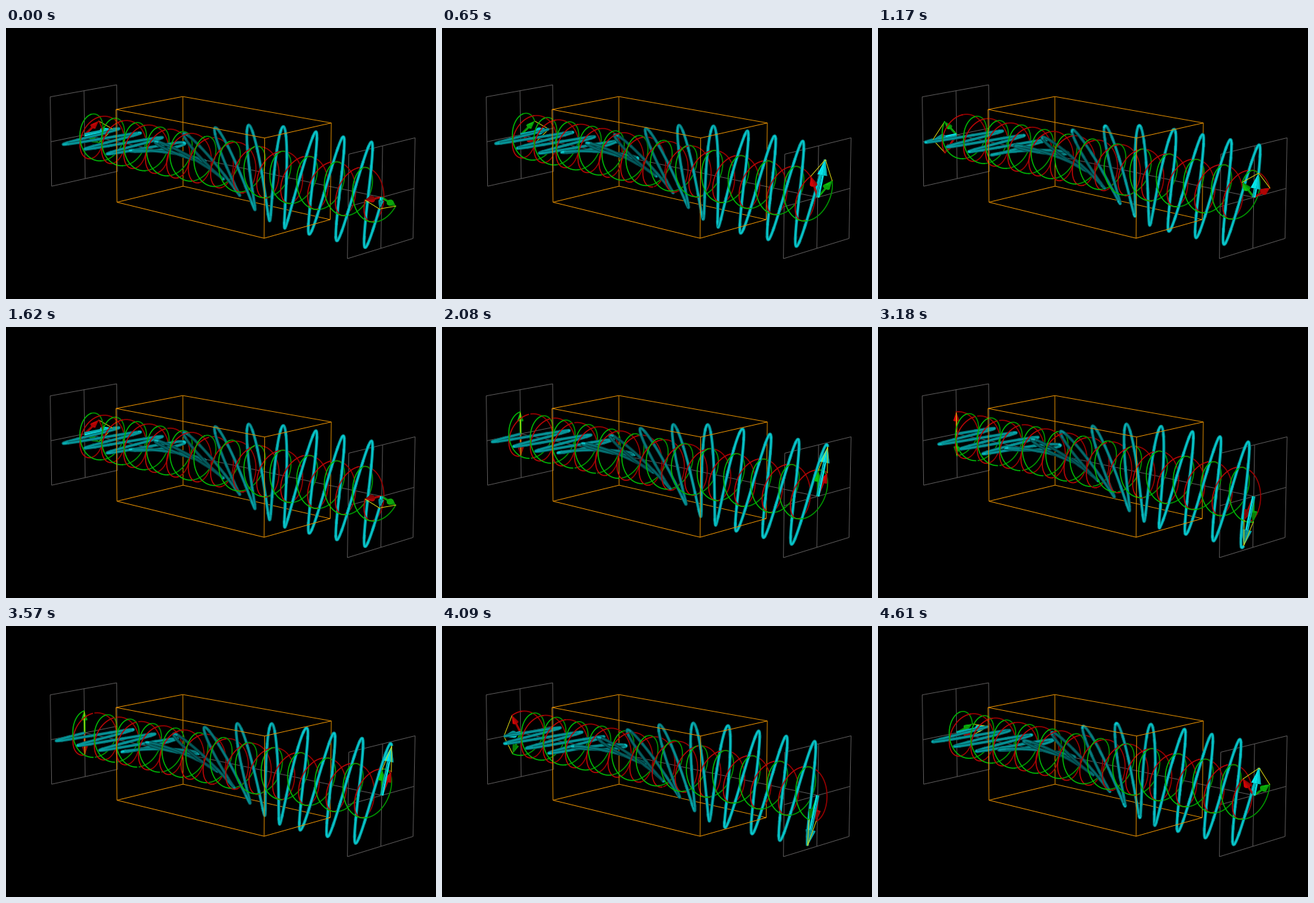
Recreate the animation shown at these times as a matplotlib script. Size 628 by 396 pixels, loop 4.67 s.

```python
import numpy as np
import matplotlib.pyplot as plt
from matplotlib.animation import FuncAnimation
from matplotlib.collections import LineCollection, PolyCollection

W, H, DPI = 628, 396, 100
PX = 72 / DPI
LOOP, STEP = 4670, 10
FRAMES = LOOP // STEP

# Scene axes: s runs along the beam (0..1), u is sideways, v is up (both -1..1).
RIM = [(-1, 1), (1, 1), (1, -1), (-1, -1)]
BOX = (0.25, 0.75)
DEPTH = 6.5               # beam length in units of u and v
TURNS = 12                # waves between the two screens
EXTRA = np.radians(214)   # extra phase of the red wave inside the box
RADIUS = 0.5

POSES = 37                # the picture holds between evenly spaced poses
PACE = [(0, 0), (5, 20), (9, 37), (21, 83), (28, 112), (36, 141)]   # pose, turn
TURN = np.radians(15)

RED, GREEN, CYAN = (0.86, 0.02, 0.02), (0.05, 0.8, 0.05), (0.02, 0.93, 0.95)


def fit_camera():
    """Least-squares perspective matrix from two opposite corners per slice."""
    corners = {(0, -1, 1): (64, 100), (0, 1, -1): (162, 209),
               (0.25, 1, 1): (258, 100), (0.25, -1, -1): (162, 254),
               (0.75, -1, 1): (377, 160), (0.75, 1, -1): (473, 279),
               (1, 1, 1): (597, 160), (1, -1, -1): (498, 337)}
    rows, values = [], []
    for (s, u, v), (x, y) in corners.items():
        p, zero = [s, u, v, 1], [0] * 4
        rows.append(p + zero + [-x * s, -x * u, -x * v])
        rows.append(zero + p + [-y * s, -y * u, -y * v])
        values += [x, y]
    m = np.linalg.lstsq(np.array(rows, float), np.array(values, float), rcond=None)[0]
    return np.append(m, 1).reshape(3, 4)


CAMERA = fit_camera()


def project(s, u, v):
    """Return screen points and their depth (smaller is nearer)."""
    s, u, v = np.broadcast_arrays(*np.atleast_1d(s, u, v))
    x, y, w = CAMERA @ np.array([s, u, v, np.ones(s.shape)], float)
    return np.column_stack([x / w, y / w]), w


def line3d(a, b):
    return project(*np.array([a, b], float).T)[0]


def unit(angle):
    return np.array([np.cos(angle), np.sin(angle)])


fig = plt.figure(figsize=(W / DPI, H / DPI), dpi=DPI, facecolor="black")
ax = fig.add_axes([0, 0, 1, 1])
ax.set_xlim(-0.5, W - 0.5)     # whole numbers are pixel centres
ax.set_ylim(H - 0.5, -0.5)
ax.axis("off")


def add_lines(segments, color, z):
    ax.add_collection(LineCollection(segments, colors=color, linewidths=PX, zorder=z))


def draw_set():
    grid = [line3d((0, 0, 0), (1, 0, 0))]
    for s in (0, 1):
        grid += [line3d((s, *RIM[k]), (s, *RIM[k - 1])) for k in range(4)]
        grid.append(line3d((s, -1, 0), (s, 1, 0)))
        grid.append(line3d((s, 0, -1), (s, 0, 1)))
    add_lines(grid, "#5a5858", 1)

    near, far = [], []
    for k, corner in enumerate(RIM):
        behind = corner[0] > 0
        (far if behind else near).append(line3d(*((s, *corner) for s in BOX)))
        behind = behind and RIM[k - 1][0] > 0
        for s in BOX:
            (far if behind else near).append(line3d((s, *corner), (s, *RIM[k - 1])))
    add_lines(far, "#d88800", 1.5)
    add_lines(near, "#e48e00", 5)


draw_set()

# Beam samples and the phase each circular wave gathers along the way
N = 601
S = np.linspace(0, 1, N)
GREEN_PHASE = 2 * np.pi * TURNS * S
RED_PHASE = GREEN_PHASE + EXTRA * np.clip((S - BOX[0]) / (BOX[1] - BOX[0]), 0, 1)

helices = []
for back, front in (("#980000", "#b80606"), ("#009400", "#00b606")):
    helices.append([ax.plot([], [], color=c, lw=1.6 * PX, zorder=z)[0]
                    for c, z in ((back, 2), (front, 4))])

# The tube is built from short chunks; each strand gets its rim, then its core.
CHUNK, STRAND = 4, 24
parts = [(a, core) for start in range(0, N - 1, STRAND) for core in (False, True)
         for a in range(start, min(start + STRAND, N - 1), CHUNK)]
STARTS = np.array([a for a, _ in parts])
CORE = np.array([core for _, core in parts])
tube = LineCollection([], linewidths=np.where(CORE, 2.4, 4.5) * PX,
                      capstyle="butt", joinstyle="round", zorder=3)
ax.add_collection(tube)
LIGHT = unit(np.radians(145))

arrows, ties = [], []
for z in (1.8, 6):
    arrows.append(ax.add_collection(PolyCollection([], linewidths=0, zorder=z)))
    ties.append(ax.plot([], [], color="#d8d410", lw=PX, zorder=z + 0.1)[0])


def arrow(s, tip, color, head, radius, width):
    """Polygons and colours of a shaft with a cone on its end."""
    color = np.array(color)
    length = np.hypot(*tip)
    if length < 0.02:
        return [], []
    d = tip / length
    k = min(1, length / (1.4 * head))
    head, radius = head * k, radius * k
    base = tip - d * head

    t = np.linspace(0, 2 * np.pi, 11)
    ring, depth = project(s + radius * np.sin(t) / DEPTH,
                          base[0] - d[1] * radius * np.cos(t),
                          base[1] + d[0] * radius * np.cos(t))
    (p_tip,), (w_tip,) = project(s, *tip)
    (p_base,), (w_base,) = project(s, *base)
    (p_0,), _ = project(s, 0, 0)

    axis = p_base - p_0
    normal = np.array([-axis[1], axis[0]]) / max(np.hypot(*axis), 1e-6) * width / 2
    polys = [np.array([p_0 + side, p_base + side, p_base, p_0])
             for side in (normal, -normal)]
    colors = [color * 0.95, color * 0.72]

    order = sorted(range(10), key=lambda j: -(depth[j] + depth[j + 1]))
    cone = [np.array([p_tip, ring[j], ring[j + 1]]) for j in order]
    shades = [color * (0.78 + 0.22 * np.cos(t[j] + 0.6)) for j in order]
    if w_tip > w_base:
        cone, shades = cone + [ring], shades + [color * 0.8]
    else:
        cone, shades = [ring] + cone, [color * 0.6] + shades
    return polys + cone, colors + shades


def draw_helix(lines, u, v):
    pts, _ = project(S, u, v)
    for line, shown in zip(lines, (u >= -0.06, u <= 0)):
        line.set_data(pts[:, 0], np.where(shown, pts[:, 1], np.nan))


def draw_tube(u, v):
    pts, _ = project(S, u, v)
    t = np.array([np.gradient(S) * DEPTH, np.gradient(u), np.gradient(v)])
    t /= np.linalg.norm(t, axis=0)
    lit = np.sqrt(np.clip(1 - (t[1] * LIGHT[0] + t[2] * LIGHT[1]) ** 2, 0, 1))
    shade = 0.36 + 0.64 * lit[STARTS + CHUNK // 2]
    shade = shade * np.where(CORE, 1, 0.64)
    tube.set_segments([pts[a:a + CHUNK + 2] for a in STARTS])
    tube.set_color(np.outer(shade, (0.03, 0.8, 0.82)))


def draw_arrows(k, s, red, green):
    total = red + green
    small, large = (0.2, 0.062, 3), (0.3, 0.08, 5)
    polys, colors = [], []
    for tip, color, size in ((red, RED, small), (green, GREEN, small),
                             (total, CYAN, large)):
        shapes, shades = arrow(s, tip, color, *size)
        polys += shapes
        colors += shades
    arrows[k].set_verts(polys)
    arrows[k].set_facecolor(np.clip(colors, 0, 1))
    corner, _ = project(s, *np.array([red, total, green]).T)
    ties[k].set_data(corner[:, 0], corner[:, 1])


def update(i):
    pose = i * POSES // FRAMES
    phase = TURN * (10 - np.round(np.interp(pose, *zip(*PACE))))
    red = RADIUS * unit(np.pi - phase - RED_PHASE)
    green = RADIUS * unit(np.pi + phase + GREEN_PHASE)
    draw_helix(helices[0], *red)
    draw_helix(helices[1], *green)
    draw_tube(*(red + green))
    draw_arrows(0, 0, red[:, 0], green[:, 0])
    draw_arrows(1, 1, red[:, -1], green[:, -1])
    return []


anim = FuncAnimation(fig, update, frames=FRAMES, interval=STEP,
                     init_func=lambda: update(0), repeat=True, repeat_delay=0,
                     blit=False)
plt.show()
```
